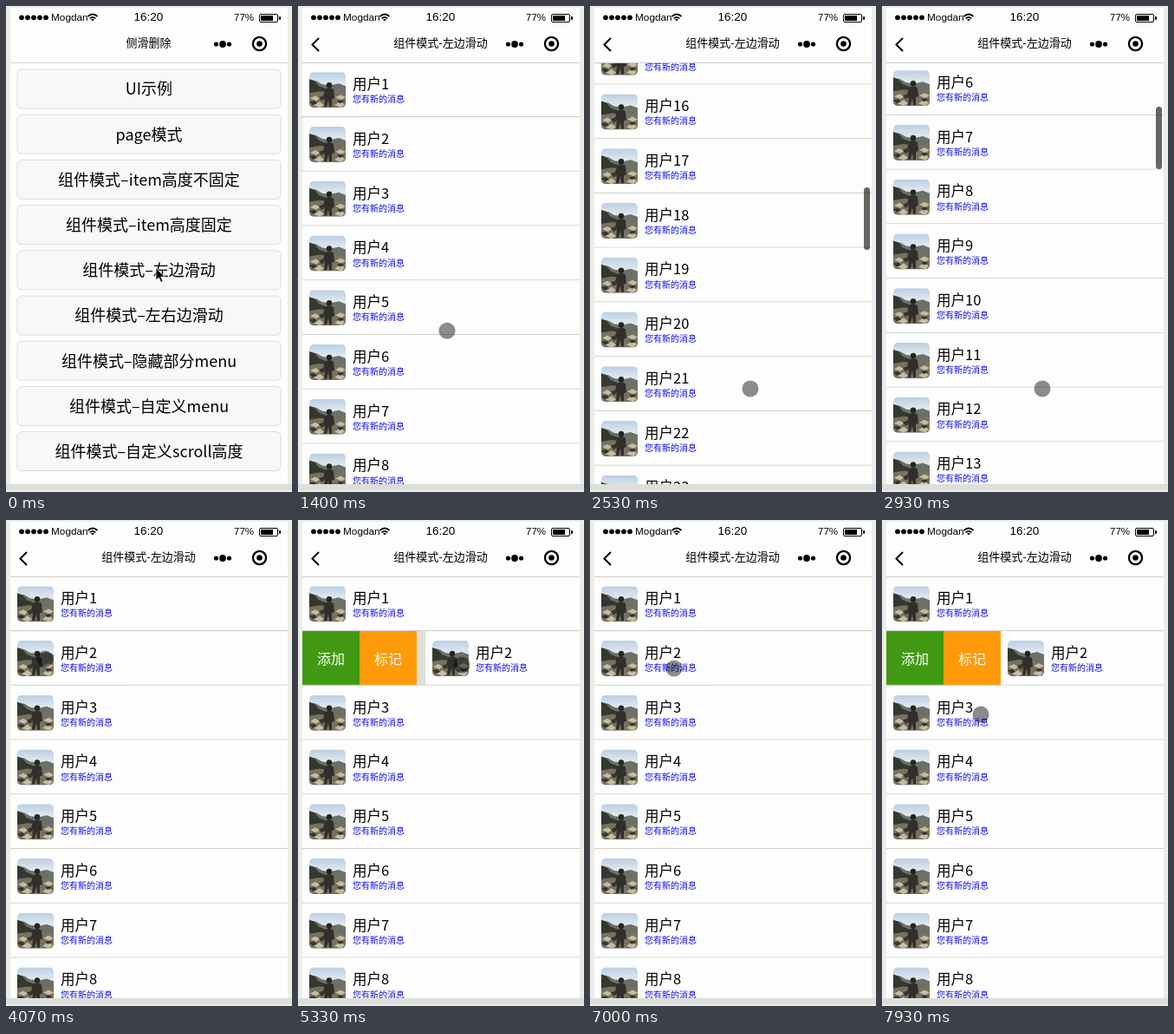
An HTML page for the animation above (8000 ms loop, 330 by 560 pixels).

```html
<!DOCTYPE html>
<html lang="zh-CN">
<head>
<meta charset="utf-8">
<style>
html, body { margin: 0; width: 100%; height: 100%; overflow: hidden; background: #ecece8; }
svg { display: block; width: 330px; height: 560px; font-family: "Noto Sans CJK SC", "Noto Sans", sans-serif; }
.status { font-family: "Liberation Sans", Arial, sans-serif; }
.mid { text-anchor: middle; }
.paper { fill: #fdfdfd; }
.line { stroke: #cdcdca; stroke-width: 1; }
.name { font-size: 16.5px; }
.note { font-size: 10px; fill: #0a0af0; }
.title { font-size: 13px; }
.item { font-size: 18px; }
.action { font-size: 16px; fill: #fff; }
</style>
</head>
<body>
<svg viewBox="0 0 330 560">
  <defs>
    <clipPath id="screen"><rect x="5" y="22" width="320" height="529"/></clipPath>
    <clipPath id="body"><rect x="5" y="65.5" width="320" height="485.5"/></clipPath>
    <clipPath id="round"><rect width="42" height="41" rx="5"/></clipPath>
    <linearGradient id="sky" x2="0" y2="1">
      <stop offset="0" stop-color="#b9cfe4"/><stop offset=".4" stop-color="#e9eef0"/>
    </linearGradient>
    <g id="photo" clip-path="url(#round)">
      <rect width="42" height="41" fill="url(#sky)"/>
      <path d="M0 9 8 10 15 14 25 15 34 13 42 16V28H0Z" fill="#6b7168"/>
      <path d="M0 8 6 10 11 16 19 19V27H0Z" fill="#34382f"/>
      <path d="M0 24 12 22 28 24 42 22V41H0Z" fill="#77715f"/>
      <path d="M1 30l6-3 5 3-4 3zM30 29l6-3 6 3-5 3zM5 38l7-4 5 4-5 3zM29 38l6-4 6 3-4 4z" fill="#c6bda2"/>
      <path d="M0 34l6-1 3 3-5 2zM11 29l5-2 2 4-4 2zM32 33l6-1 2 2-5 2z" fill="#37342c"/>
      <circle cx="23" cy="15" r="3.2" fill="#25251f"/>
      <path d="M18 20q5-4 10 0l1 10-3 1v9h-3l-1-8-2 8h-3l1-10-2-2z" fill="#302f2b"/>
    </g>
  </defs>

  <rect x="5" y="2" width="320" height="549" class="paper"/>
  <rect y="551" width="330" height="7" fill="#dededa"/>
  <g id="status" class="status"></g>

  <g clip-path="url(#screen)">
    <g id="menu"></g>
    <g id="list">
      <rect x="5" y="22" width="320" height="529" class="paper"/>
      <g clip-path="url(#body)"><g id="rows"></g></g>
      <path class="line" d="M5 65.5H325"/>
      <text class="title mid" x="164.5" y="47.2">组件模式-左边滑动</text>
      <path d="M24 37 16.5 44.5 24 52" fill="none" stroke="#000" stroke-width="2"/>
    </g>
  </g>

  <g>
    <circle cx="242.5" cy="44" r="2.6"/><circle cx="250" cy="44" r="3.9"/><circle cx="257.5" cy="44" r="2.6"/>
    <circle cx="292.5" cy="43.5" r="7.6" fill="none" stroke="#000" stroke-width="2.3"/>
    <circle cx="292.5" cy="43.5" r="3.3"/>
  </g>
  <rect id="bar" x="316" width="7" height="72" rx="3.5"/>
  <path id="arrow" d="M173 302v14l3.3-3 2.4 5.3 2.4-1-2.4-5.2h4.6z" stroke="#fff" stroke-width=".8"/>
  <circle id="dot" r="9.5"/>
</svg>
<script>
const $ = id => document.getElementById(id);
const LOOP = 8000, PITCH = 62.75, ROWS = 50;

$("status").innerHTML =
  [0, 1, 2, 3, 4].map(i => `<circle cx="${18 + 7 * i}" cy="13.3" r="2.9"/>`).join("") + `
  <text x="52" y="17" font-size="11.8">Mogdan</text>
  <g fill="none" stroke="#000" stroke-width="1.7">
    <path d="M94.5 12q5.5-5 11 0M96.7 14.3q3.3-3 6.6 0"/></g>
  <path d="M98 15.5q2-1.5 4 0l-2 2z"/>
  <text class="mid" x="164.5" y="17.2" font-size="13.5">16:20</text>
  <text x="263" y="17" font-size="11.5">77%</text>
  <rect x="292.5" y="9.5" width="21" height="9" rx="1.5" fill="none" stroke="#000"/>
  <rect x="294" y="11" width="14" height="6"/><rect x="315" y="12" width="2" height="4" rx="1"/>`;

const items = ["UI示例", "page模式", "组件模式–item高度不固定", "组件模式–item高度固定",
  "组件模式–左边滑动", "组件模式–左右边滑动", "组件模式–隐藏部分menu",
  "组件模式–自定义menu", "组件模式–自定义scroll高度"];
$("menu").innerHTML = `<text class="title mid" x="164.5" y="47.2">侧滑删除</text>
  <path d="M5 65.5H325" stroke="#d6d6d2"/>` + items.map((s, i) => {
    const y = 73 + 52.2 * i;
    return `<rect x="13" y="${y}" width="304" height="45" rx="5" fill="#f8f8f8" stroke="#dcdcdc"/>
      <text class="item mid" x="165" y="${y + 29.3}">${s}</text>`;
  }).join("");

const row = n => `<g transform="translate(0 ${65.3 + PITCH * (n - 1)})">
  ${n == 2 ? `<rect x="5" width="320" height="${PITCH}" fill="#dededa"/>
    <rect x="5" width="66" height="${PITCH}" fill="#429a14"/>
    <rect x="71" width="66" height="${PITCH}" fill="#ff9a0a"/>
    <text class="action mid" x="38" y="38">添加</text>
    <text class="action mid" x="104" y="38">标记</text>` : ""}
  <g ${n == 2 ? 'id="slide"' : ""}>
    <rect x="5" width="320" height="${PITCH}" class="paper"/>
    <use href="#photo" x="13" y="11"/>
    <text class="name" x="63" y="30.8">用户${n}</text>
    <text class="note" x="63" y="46">您有新的消息</text>
  </g>
  <path class="line" d="M5 ${PITCH - .5}H325"/></g>`;
$("rows").innerHTML = Array.from({ length: ROWS }, (_, i) => row(i + 1)).join("");

const linear = p => p;
const smooth = p => p * p * (3 - 2 * p);
const speedUp = p => p * p;
const slowDown = p => p * (2 - p);
const out = p => 1 - (1 - p) ** 3;
// Each key is [time, value, easing towards it].
function at(t, keys) {
  const i = keys.findIndex(k => k[0] > t);
  if (i < 0) return keys[keys.length - 1][1];
  if (!i) return keys[0][1];
  const [t0, v0] = keys[i - 1], [t1, v1, ease = smooth] = keys[i];
  return v0 + (v1 - v0) * ease((t - t0) / (t1 - t0));
}

const page = [[1070, 320], [1420, 0, out]];
const scroll = [[1560, 0], [1760, 295, speedUp], [2130, 831, linear], [2330, 960, slowDown],
  [2530, 918, speedUp], [3500, 0, slowDown]];
const barFade = [[1560, 0], [1600, .6], [3550, .6], [3850, 0]];
const fingerX = [[1250, 172], [1550, 172], [1760, 170], [2310, 170], [2530, 185], [3200, 185], [3950, 45],
  [4560, 45], [5330, 189], [5750, 189], [6350, 97], [7080, 97], [7530, 239], [7930, 114]];
const fingerY = [[1250, 306], [1550, 441], [1760, 146], [2150, 146], [2530, 441],
  [3200, 441], [3950, 160], [4560, 160], [5330, 167], [5750, 167], [6350, 171], [7080, 171],
  [7530, 171], [7930, 224]];
const slide = [[4560, 0], [5330, 142], [5400, 142], [5600, 132, out], [5750, 132], [6350, 40],
  [6600, 0, out], [7080, 0], [7530, 142], [7600, 142], [7780, 132, out]];
const press = [[730, .2], [930, .45]];

const move = (id, x, y = 0) => $(id).setAttribute("transform", `translate(${x} ${y})`);
const fade = (id, v) => $(id).setAttribute("opacity", v);

function draw(now) {
  const t = now % LOOP, px = at(t, page), s = at(t, scroll);
  move("list", px);
  move("menu", (px - 320) * .3);
  $("list").setAttribute("visibility", px < 320 ? "visible" : "hidden");
  move("rows", 0, -s);
  move("slide", at(t, slide));
  $("bar").setAttribute("y", 67 + s * .155);
  fade("bar", at(t, barFade));
  fade("arrow", t < 500 ? 1 : 0);
  fade("dot", t < 500 ? 0 : at(t, press));
  move("dot", at(t, fingerX), at(t, fingerY));
  requestAnimationFrame(draw);
}
requestAnimationFrame(draw);
</script>
</body>
</html>
```
